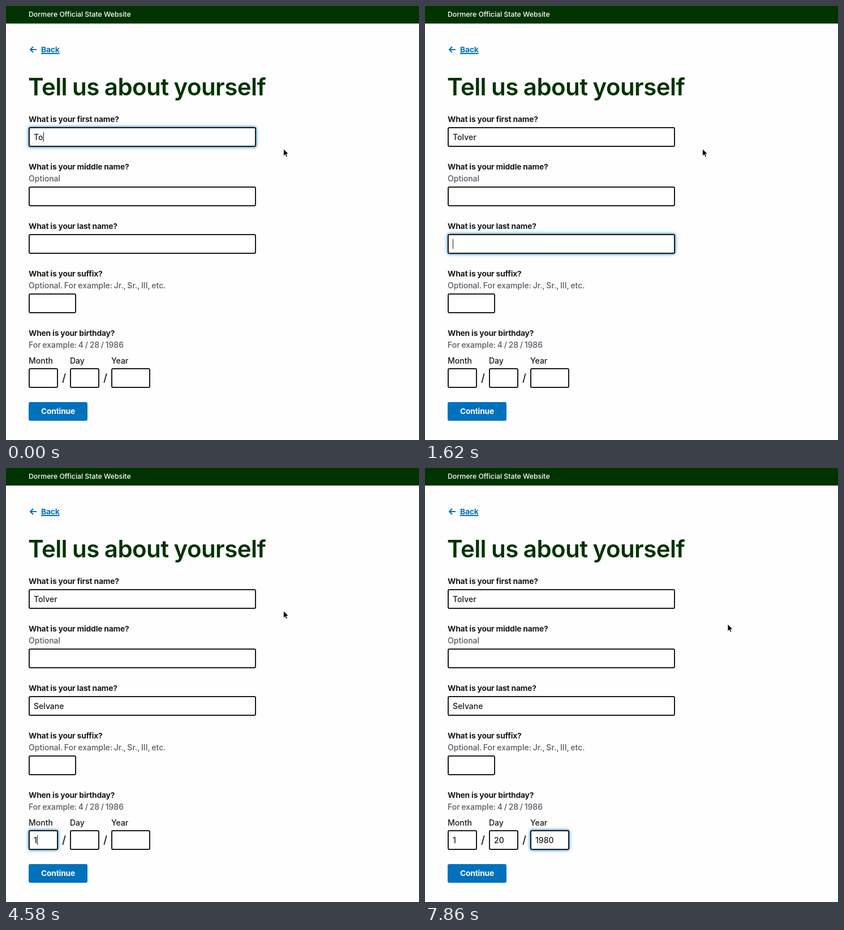
An HTML page for the animation above (8 s loop, 730 by 767 pixels).

```html
<!DOCTYPE html>
<html lang="en">
<head>
<meta charset="utf-8">
<title>Tell us about yourself</title>
<style>
  html, body { margin: 0; width: 100%; height: 100%; overflow: hidden; background: #fefefe; }
  body {
    position: relative;
    font: 450 14px/20px Inter, "Open Sans", sans-serif;
    font-optical-sizing: none;
    word-spacing: -1px;
    color: #1b1b1b;
  }
  body > * { position: absolute; box-sizing: border-box; white-space: pre; }
  header {
    left: 0; top: 0; width: 100%; height: 31px; padding-left: 40px;
    background: #030; color: #fff; font-size: 12.3px; font-weight: 500; line-height: 30px; word-spacing: 0;
  }
  h1 {
    left: 39px; top: 117px; margin: 0; color: #030;
    font-size: 42px; font-weight: 600; line-height: 51px; letter-spacing: -.55px;
  }
  .label, .back, .button { font-size: 13.8px; font-weight: 700; letter-spacing: -.18px; word-spacing: 0; }
  .hint { color: #565c65; }
  .back { color: #0071bc; text-decoration: underline 1.5px; text-underline-offset: 1px; }
  .slash { font-size: 19px; font-weight: 500; }
  .field {
    display: flex; align-items: center; height: 35px; padding-left: 7px;
    border: 2px solid #1b1b1b; border-radius: 3px; background: #fff;
  }
  .focused { box-shadow: 0 0 3px #3e94cf, 0 0 6px #3e94cf; }
  .caret::after { content: ""; width: 1px; height: 17px; background: #1b1b1b; }
  .button {
    left: 40px; top: 700px; width: 104px; height: 33px; border-radius: 3px;
    background: #0071bc; color: #fff; line-height: 33px; text-align: center;
  }
  svg { left: 0; top: 0; overflow: visible; }
</style>
</head>
<body>
<header>Dormere Official State Website</header>
<svg width="60" height="90" fill="none" stroke="#0071bc" stroke-width="2"><path d="M54 77H43M48 72l-5 5 5 5"/></svg>
<h1>Tell us about yourself</h1>
<div class="button">Continue</div>
<svg id="cursor" width="12" height="18"><path d="M.5.5v12.6l2.9-2.7 1.9 4.3 2.1-.9-1.8-4.2h3.8z" fill="#000" stroke="#fff" stroke-width=".8"/></svg>
<script>
const LOOP = 8000;
const cursor = document.getElementById("cursor");

function add(className, left, top, text = "") {
  const el = document.createElement("div");
  el.className = className;
  el.style.left = left + "px";
  el.style.top = top + "px";
  el.textContent = text;
  document.body.insertBefore(el, cursor);
  return el;
}

// Text lines are placed by their vertical centre.
const addText = (className, left, centre, text) => add(className, left, centre - 10, text);

function addField(left, top, width) {
  const el = add("field", left, top);
  el.style.width = width + "px";
  return el;
}

addText("back", 62, 77, "Back");
addText("label", 40, 200, "What is your first name?");
addText("label", 40, 284, "What is your middle name?");
addText("hint", 40, 305, "Optional");
addText("label", 40, 389, "What is your last name?");
addText("label", 40, 473, "What is your suffix?");
addText("hint", 40, 494, "Optional. For example: Jr., Sr., III, etc.");
addText("label", 40, 578, "When is your birthday?");
addText("hint", 40, 599, "For example: 4 / 28 / 1986");
addText("", 40, 627, "Month");
addText("", 113, 627, "Day");
addText("", 186, 627, "Year");
addText("slash", 99, 658, "/");
addText("slash", 172, 658, "/");

const fields = {
  first: addField(40, 214, 402),
  middle: addField(40, 319, 402),
  last: addField(40, 403, 402),
  suffix: addField(40, 508, 84),
  month: addField(40, 640, 52),
  day: addField(113, 640, 52),
  year: addField(186, 640, 69),
};

// Each visit: field, full text, letters at the start, focus time, typing times, caret-off time.
const visits = [
  ["first", "Tolver", 2, 0, [440, 740, 890, 1030]],
  ["middle", "", 0, 1320, []],
  ["last", "Selvane", 0, 1620, [2220, 2520, 2670, 2810, 3110, 3260, 3400], 2070],
  ["suffix", "", 0, 3700, []],
  ["month", "1", 0, 3840, [4580], 4440],
  ["day", "20", 0, 4880, [5180, 5480]],
  ["year", "1980", 0, 5770, [6220, 6670, 6970, 7260], 7710],
];

function draw() {
  const time = performance.now() % LOOP;
  const current = visits.findLast(visit => visit[3] <= time);
  for (const visit of visits) {
    const [name, text, start, , keys, caretOff = Infinity] = visit;
    const typed = keys.filter(key => key <= time);
    const focused = visit === current;
    const hidden = time >= caretOff && !typed.some(key => key > caretOff);
    const field = fields[name];
    field.textContent = text.slice(0, start + typed.length);
    field.classList.toggle("focused", focused);
    field.classList.toggle("caret", focused && !hidden);
  }
  const [x, y] = time < 7860 ? [490, 252] : [534.5, 275.5];
  cursor.style.transform = `translate(${x}px, ${y}px)`;
  requestAnimationFrame(draw);
}
draw();
</script>
</body>
</html>
```
